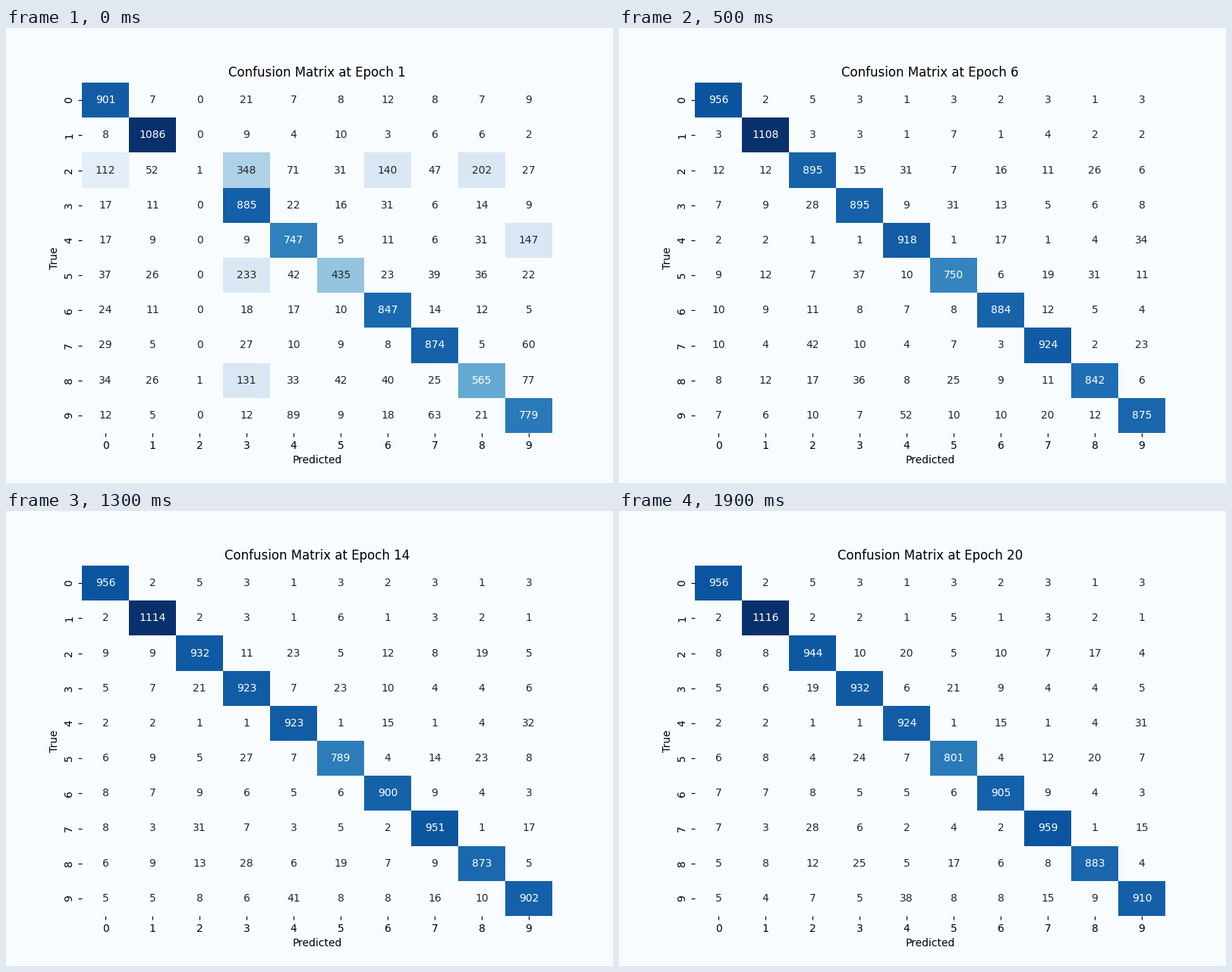
A matplotlib script that plays this animation: 800 by 600 pixels, repeating every 2 s.

```python
import numpy as np
import matplotlib.pyplot as plt
from matplotlib.animation import FuncAnimation

EPOCHS, STEP = 20, 100
SIZE = 10
SETTLED = 4  # epoch at which the fast early learning ends

# Samples per class, and correct predictions at epochs 1, SETTLED and EPOCHS
TOTALS = np.array([980, 1135, 1032, 1010, 982, 892, 958, 1028, 974, 1009])
START = np.array([901, 1086, 1, 885, 747, 435, 847, 874, 565, 779])
EARLY = np.array([956, 1104, 871, 876, 915, 725, 873, 907, 822, 857])
FINAL = np.array([956, 1116, 944, 932, 924, 801, 905, 959, 883, 910])

# Strongest confusions: (true, predicted) -> count
START_PAIRS = {(2, 0): 112, (2, 3): 348, (2, 4): 71, (2, 6): 140, (2, 8): 202,
               (4, 9): 147, (5, 3): 233, (7, 9): 60, (8, 3): 131, (8, 9): 77,
               (9, 4): 89, (9, 7): 63}
FINAL_PAIRS = {(2, 8): 17, (3, 2): 19, (3, 5): 21, (4, 6): 15, (4, 9): 31,
               (5, 3): 24, (5, 8): 20, (7, 2): 28, (7, 9): 15, (8, 5): 17,
               (9, 4): 38, (9, 7): 15}

# How readily each class is guessed; 2 is hardly ever guessed at first
START_PULL = np.array([2, 1, 0.03, 2, 2, 1, 2, 1, 2, 1])
JITTER = np.random.default_rng(4).lognormal(0, 0.45, (SIZE, SIZE))


def ease(t, start, end, power):
    """Power-law learning curve, 0 at start and 1 at end."""
    t = float(np.clip(t, start, end))
    first, last = float(start) ** -power, float(end) ** -power
    return (first - t ** -power) / (first - last)


def shares(pairs, hits, pull):
    """Fraction of each row's misses that falls on each class."""
    misses = TOTALS - hits
    fixed = np.zeros((SIZE, SIZE))
    rest = JITTER * pull
    np.fill_diagonal(rest, 0)
    for (row, col), n in pairs.items():
        fixed[row, col] = n / misses[row]
        rest[row, col] = 0
    left = (1 - fixed.sum(axis=1)) / rest.sum(axis=1)
    return fixed + rest * left[:, None]


START_SHARE = shares(START_PAIRS, START, START_PULL)
FINAL_SHARE = shares(FINAL_PAIRS, FINAL, np.ones(SIZE))


def counts(t):
    fast = ease(t, 1, SETTLED, 2)
    slow = ease(t, SETTLED, EPOCHS, 0.5)
    hits = START + (EARLY - START) * fast + (FINAL - EARLY) * slow
    share = START_SHARE + (FINAL_SHARE - START_SHARE) * fast
    m = share * (TOTALS - hits)[:, None]
    np.fill_diagonal(m, hits)
    return np.rint(m).astype(int)


def shades(m):
    """Relative level; pale tints merge and the palest are left clear."""
    level = m / m.max()
    level = np.where((level > 0.115) & (level < 0.22), 0.155, level)
    return np.ma.masked_less(level, 0.1)


plt.rcParams["font.family"] = "DejaVu Sans"
fig, ax = plt.subplots(figsize=(8, 6), dpi=100, facecolor="#f9fcff")
ax.patch.set_visible(False)
for spine in ax.spines.values():
    spine.set_visible(False)

mesh = ax.pcolormesh(shades(counts(1)), cmap="Blues", vmin=0, vmax=1)
ax.set(xlim=(0, SIZE), ylim=(SIZE, 0), xlabel="Predicted", ylabel="True")
mids = np.arange(SIZE) + 0.5
ax.set_xticks(mids, range(SIZE))
ax.set_yticks(mids, range(SIZE), rotation="vertical", va="center")
title = ax.set_title("")
labels = [[ax.text(x, y, "", ha="center", va="center") for x in mids]
          for y in mids]


def update(i):
    m = counts(i + 1)
    title.set_text(f"Confusion Matrix at Epoch {i + 1}")
    mesh.set_array(shades(m))
    for row, values in zip(labels, m):
        for label, n in zip(row, values):
            label.set_text(str(n))
            label.set_color("white" if n > 0.45 * m.max() else "#262626")
    return []


anim = FuncAnimation(fig, update, frames=EPOCHS, interval=STEP,
                     init_func=lambda: update(0), repeat=True, repeat_delay=0)
plt.show()
```
